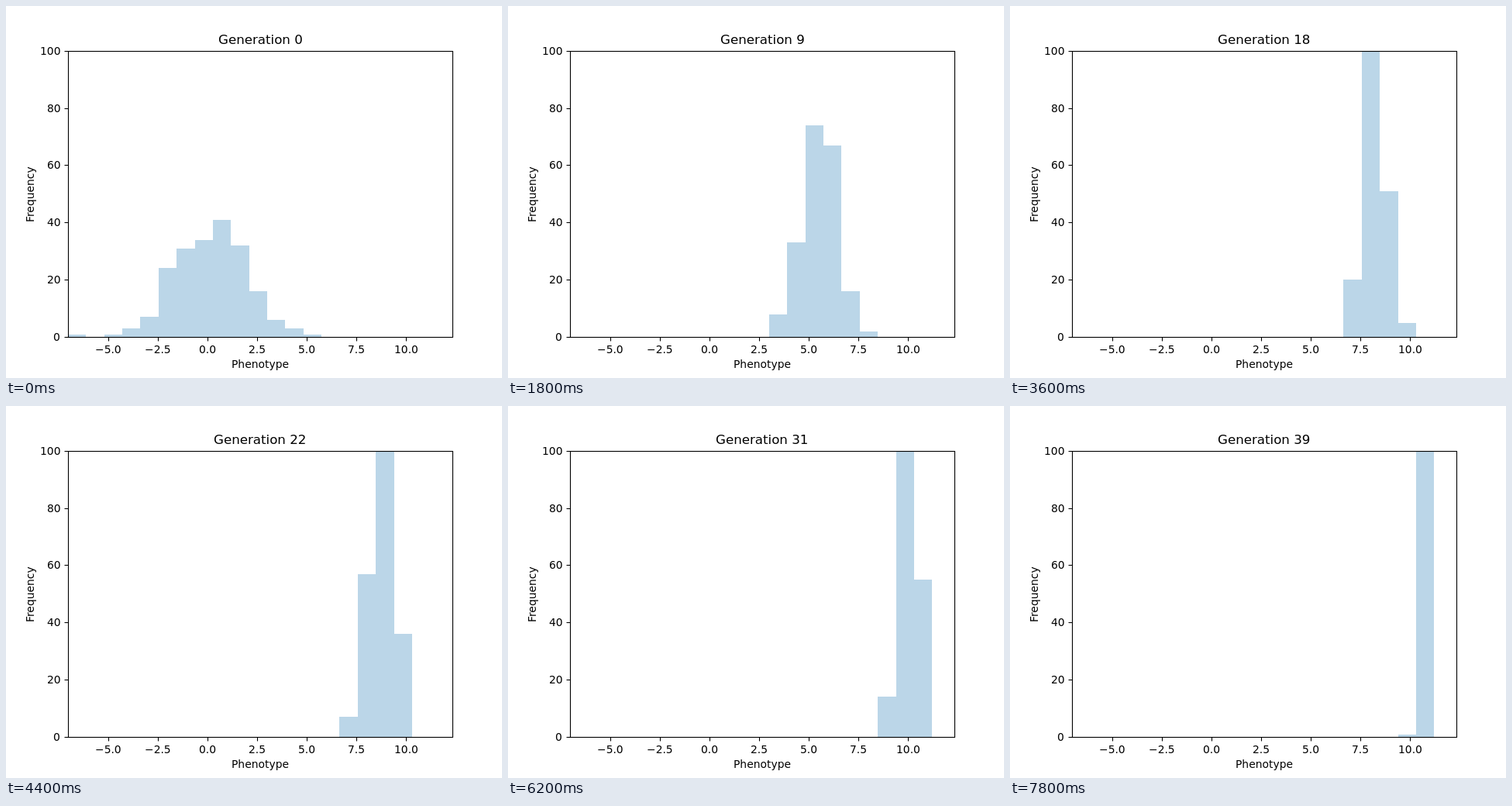
An HTML page with a canvas that plays this animation: 640x480 px, repeating every 8000 ms.

```html
<!DOCTYPE html>
<html lang="en">
<head>
<meta charset="utf-8">
<title>Phenotype histogram</title>
<style>
  html, body { margin: 0; width: 100%; height: 100%; overflow: hidden; background: #fff; }
  canvas { display: block; width: 640px; height: 480px; }
</style>
</head>
<body>
<canvas id="stage" width="640" height="480"></canvas>
<script>
const ctx = document.getElementById('stage').getContext('2d');

const STEP_MS = 200, GENERATIONS = 40, POPULATION = 200;
const LEFT = 80, RIGHT = 576, TOP = 57.6, BOTTOM = 427.2;
const BIN_WIDTH = 23.365, BIN_COUNT = 20;
const FONT = '"DejaVu Sans", sans-serif';

// Known populations: generation, first occupied bin, counts per bin.
const KEYS = [
  { gen: 0, first: 0, counts: [1, 0, 1, 3, 7, 24, 31, 34, 41, 32, 16, 6, 3, 1] },
  { gen: 4, first: 5, counts: [1, 1, 3, 15, 34, 45, 55, 32, 10, 4] },
  { gen: 6, first: 8, counts: [1, 8, 27, 52, 58, 37, 14, 3] },
  { gen: 9, first: 11, counts: [8, 33, 74, 67, 16, 2] },
  { gen: 12, first: 12, counts: [3, 24, 73, 73, 24, 3] },
  { gen: 18, first: 15, counts: [20, 124, 51, 5] },
  { gen: 24, first: 16, counts: [23, 125, 52] },
  { gen: 26, first: 16, counts: [2, 104, 93, 1] },
  { gen: 31, first: 17, counts: [14, 131, 55] },
  { gen: 36, first: 18, counts: [40, 160] },
  { gen: 39, first: 18, counts: [1, 199] }
];

// Sorted positions of all individuals, spread evenly inside each bin.
function individuals({ first, counts }) {
  return counts.flatMap((n, b) =>
    Array.from({ length: n }, (_, i) => first + b + (i + 0.5) / n));
}

// Moves each individual between the neighbouring keys and counts again.
function histogram(gen) {
  const k = Math.min(KEYS.findLastIndex(key => key.gen <= gen), KEYS.length - 2);
  const a = KEYS[k], b = KEYS[k + 1];
  const t = (gen - a.gen) / (b.gen - a.gen);
  const from = individuals(a), to = individuals(b);
  const bins = new Array(BIN_COUNT).fill(0);
  for (let i = 0; i < POPULATION; i++) {
    bins[Math.floor(from[i] * (1 - t) + to[i] * t)]++;
  }
  return bins;
}

const histograms = Array.from({ length: GENERATIONS }, (_, g) => histogram(g));
const yOf = count => Math.round(BOTTOM - count * (BOTTOM - TOP) / 100);

function text(str, x, y, size, align = 0.5) {
  ctx.font = `${size}px ${FONT}`;
  ctx.fillText(str, Math.round(x - ctx.measureText(str).width * align), y);
}

function line(x1, y1, x2, y2) {
  ctx.beginPath();
  ctx.moveTo(x1 + 0.5, y1 + 0.5);
  ctx.lineTo(x2 + 0.5, y2 + 0.5);
  ctx.stroke();
}

function drawBars(bins) {
  ctx.fillStyle = '#bbd6e8';
  bins.forEach((n, i) => {
    if (!n) return;
    const x = Math.round(LEFT + i * BIN_WIDTH);
    const end = Math.round(LEFT + (i + 1) * BIN_WIDTH);
    const y = yOf(Math.min(n, 100));
    ctx.fillRect(x, y, end - x, 427 - y);
  });
}

function drawAxes() {
  ctx.fillStyle = ctx.strokeStyle = '#000';
  ctx.lineWidth = 1.11;
  ctx.strokeRect(LEFT + 0.5, 58.5, RIGHT - LEFT, 369);
  for (let v = 0; v <= 100; v += 20) {
    const y = yOf(v);
    line(LEFT - 5, y, LEFT, y);
    text(String(v), 70.3, y + 5, 13.89, 1);
  }
  for (let i = 0; i < 7; i++) {
    const x = 132 + i * 64, v = -5 + i * 2.5;
    line(x, 427, x, 432);
    text(v.toFixed(1).replace('-', '\u2212'), x, 448, 13.89);
  }
  text('Phenotype', 328, 467, 13.89);
  ctx.save();
  ctx.translate(36, 243);
  ctx.rotate(-Math.PI / 2);
  text('Frequency', 0, 0, 13.89);
  ctx.restore();
}

function draw(now) {
  const gen = Math.floor(now / STEP_MS) % GENERATIONS;
  ctx.fillStyle = '#fff';
  ctx.fillRect(0, 0, 640, 480);
  drawBars(histograms[gen]);
  drawAxes();
  text('Generation ' + gen, 328, 49, 16.67);
}

function frame() {
  draw(performance.now());
  requestAnimationFrame(frame);
}
frame();
</script>
</body>
</html>
```
